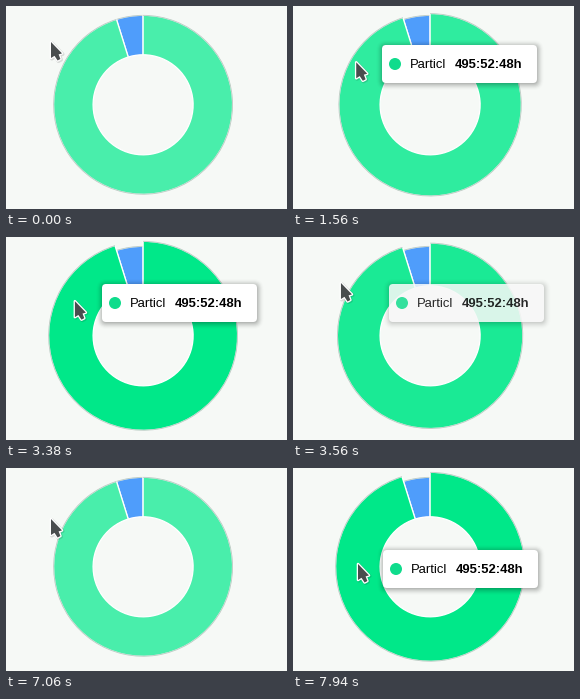
A matplotlib script for the animation above (8000 ms loop, 281 px wide and 203 px high).

```python
import numpy as np
import matplotlib.pyplot as plt
from matplotlib.animation import FuncAnimation
from matplotlib.patches import Circle, FancyBboxPatch, Polygon, Wedge
from matplotlib.transforms import Affine2D

W, H, DPI = 281, 203, 64
PX = 72 / DPI              # one pixel in points
LOOP, STEP = 8000, 20      # ms
TICK = 62.5                # ms between screen updates

CENTER = (137.1, 98.8)
R_IN, R_OUT, GROW = 50, 89.5, 5
SPLIT = 270 - 17.3         # where the blue sector starts, in degrees
BASE, HOVER = np.array([73, 238, 171]) / 255, np.array([0, 232, 137]) / 255
TIP_W, TIP_H = 155, 38

# first place, then glides: start tick, end tick, place
CURSOR = (45, 36), [(9, 10, (50, 46)), (22, 23, (59, 51)),
                    (23, 28, (71, 66)), (53, 60, (33, 33)),
                    (112, 113, (45, 51)), (114, 120, (66, 72)),
                    (124, 127, (65, 96))]
TIP = (85, 35), [(23, 28, (96, 47)), (115, 120, (91, 57)),
                 (124, 127, (90, 82))]


def ease(tick, start, end):
    u = np.clip((tick - start) / (end - start), 0, 1)
    return u * u * (3 - 2 * u)


def glide(path, tick):
    pos, moves = np.array(path[0], float), path[1]
    for start, end, place in moves:
        pos += (np.array(place) - pos) * ease(tick, start, end)
    return pos


fig = plt.figure(figsize=(W / DPI, H / DPI), dpi=DPI, facecolor="#f6f9f6")
ax = fig.add_axes([0, 0, 1, 1])
ax.set(xlim=(0, W), ylim=(H, 0))
ax.axis("off")

tip_move, cursor_move = Affine2D(), Affine2D()
tip_tf = tip_move + ax.transData
cursor_tf = cursor_move + ax.transData


def sector(start, end, color):
    body = Wedge(CENTER, R_OUT, start, end, width=R_OUT - R_IN,
                 fc=color, ec="white", lw=1.3 * PX)
    rim = Wedge(CENTER, R_OUT + .4, start, end, width=.9,
                fc="#8fa99b", ec="none", alpha=.6)
    return ax.add_patch(body), ax.add_patch(rim)


def tip_box(x, y, grow, color):
    r = 4 + grow
    box = FancyBboxPatch((x + 4, y + 4), TIP_W - 8, TIP_H - 8,
                         boxstyle=f"round,pad={r}", fc=color, ec="none",
                         transform=tip_tf, zorder=3)
    return ax.add_patch(box)


def tip_text(x, s, weight):
    return ax.text(x, 23, s, family="Liberation Sans", size=13 * PX,
                   weight=weight, color="black", va="baseline",
                   transform=tip_tf, zorder=4)


blue, _ = sector(SPLIT, 270, "#4f9dfb")
green, green_rim = sector(270, SPLIT + 360, BASE)

shadow = [tip_box(.5, 1, grow, "black") for grow in range(6, -1, -1)]
dot = Circle((13, 19), 6, fc="#0fdc8c", ec="none", transform=tip_tf, zorder=4)
tip = [tip_box(0, 0, 0, "white"), ax.add_patch(dot),
       tip_text(28, "Particl", "normal"), tip_text(73, "495:52:48h", "bold")]

arrow = np.array([(0, 0), (0, 16), (3.5, 13.8), (6.6, 18.5), (9.4, 17),
                  (7.6, 12.4), (11, 11.4)])
for shift, color, lw, alpha in [(.8, "black", 3.5, .12), (0, "white", 2.6, 1),
                                (0, "#494d4e", 0, 1)]:
    ax.add_patch(Polygon(arrow + shift, fc=color, ec=color, lw=lw * PX,
                         alpha=alpha, joinstyle="round",
                         transform=cursor_tf, zorder=5))


def draw(i):
    tick = (i * STEP + 12.5) // TICK
    glow = ease(tick, 23, 28) - ease(tick, 55, 60) + ease(tick, 115, 120)
    fade = ease(tick, 22, 23) - ease(tick, 56, 60) + ease(tick, 115, 116)

    radius = R_OUT + GROW * glow
    green.set_radius(radius)
    green.set_width(radius - R_IN)
    green.set_facecolor(BASE + (HOVER - BASE) * glow)
    green_rim.set_radius(radius + .4)

    cursor_move.clear().translate(*glide(CURSOR, tick))
    tip_move.clear().translate(*np.round(glide(TIP, tick)))
    for k, box in enumerate(shadow):
        box.set_alpha((.012 + .009 * k) * fade ** 3)
    for artist in tip:
        artist.set_alpha(fade)
    for artist in shadow + tip:
        artist.set_visible(fade > 0)
    return []


anim = FuncAnimation(fig, draw, frames=LOOP // STEP, interval=STEP,
                     repeat=True, repeat_delay=0)
plt.show()
```
